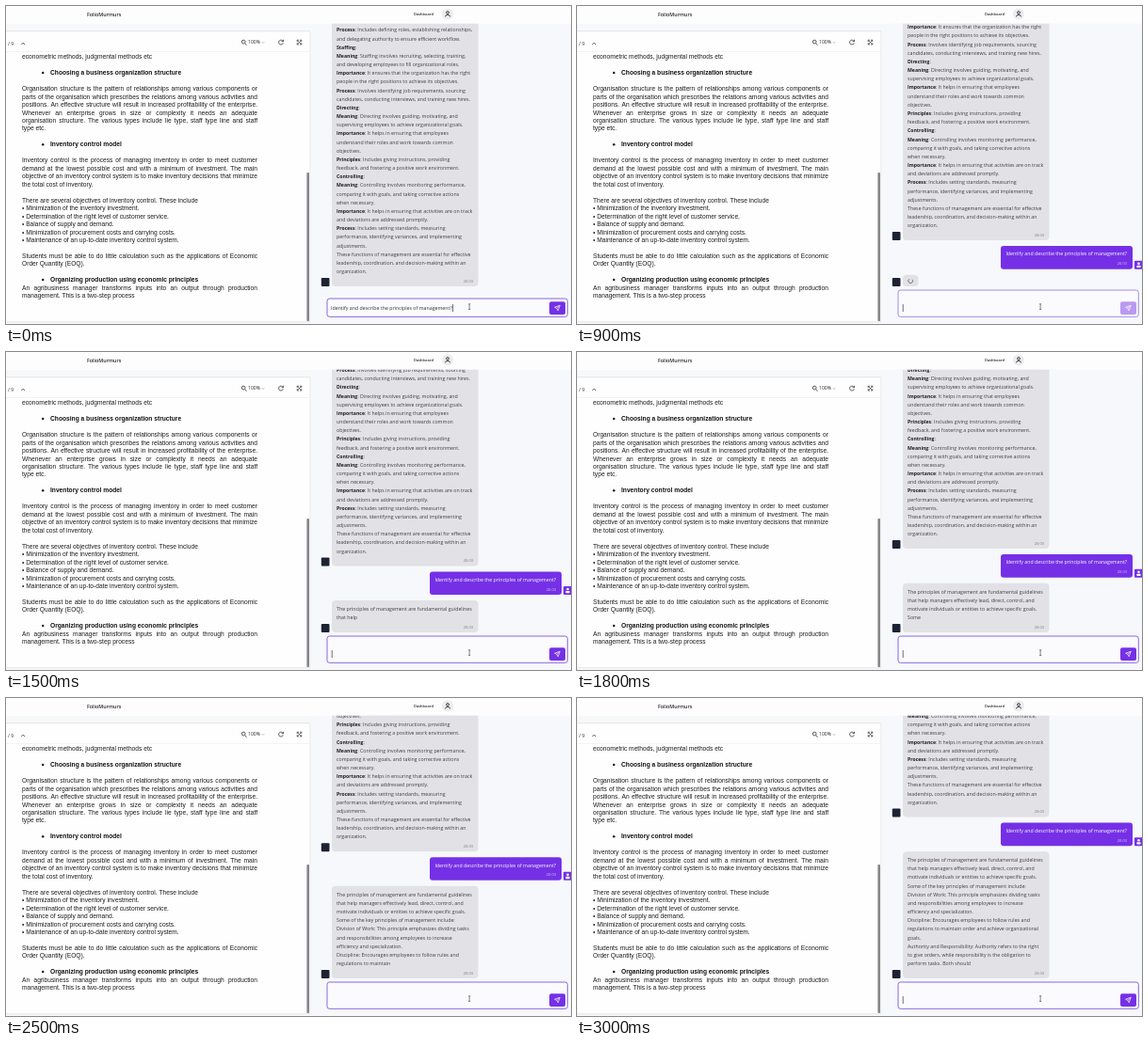
Write an HTML page with a canvas that moves like this. It is 600 px wide and 338 px high and loops after 3.1 s.

```html
<!DOCTYPE html>
<html lang="en">
<head>
<meta charset="utf-8">
<title>Document chat</title>
<style>
html, body { margin: 0; width: 100%; height: 100%; overflow: hidden; background: #fff; }
canvas { display: block; width: 600px; height: 338px; }
</style>
</head>
<body>
<canvas id="stage"></canvas>
<script>
const LOOP = 3100, STEP = 100, SENT = 200, STREAM = 1315, CHARS_PER_MS = 0.371;
const UI = '"Open Sans", "Noto Sans", sans-serif';
const DOC = '"Liberation Sans", Arial, sans-serif';
const PURPLE = '#7530e6', INK = '#3c3c42', BUBBLE = '#e2e2e6', DARK = '#1d2333';
const ROW = 9.17, CHAT_BOTTOM = 298, GAP = 6, PAD = 15.6;
const LOADER_HEIGHT = 12.3, QUESTION_HEIGHT = 24.6;
const QUESTION = 'Identify and describe the principles of management?';

// "#" marks a heading, "=" a justified line
const page = `econometric methods, judgmental methods etc

#Choosing a business organization structure

=Organisation structure is the pattern of relationships among various components or
=parts of the organisation which prescribes the relations among various activities and
=positions. An effective structure will result in increased profitability of the enterprise.
=Whenever an enterprise grows in size or complexity it needs an adequate
=organisation structure. The various types include lie type, staff type line and staff
type etc.

#Inventory control model

=Inventory control is the process of managing inventory in order to meet customer
=demand at the lowest possible cost and with a minimum of investment. The main
=objective of an inventory control system is to make inventory decisions that minimize
the total cost of inventory.

There are several objectives of inventory control. These include
• Minimization of the inventory investment.
• Determination of the right level of customer service.
• Balance of supply and demand.
• Minimization of procurement costs and carrying costs.
• Maintenance of an up-to-date inventory control system.

=Students must be able to do little calculation such as the applications of Economic
Order Quantity (EOQ).

#Organizing production using economic principles
=An agribusiness manager transforms inputs into an output through production
management. This is a two-step process`.split('\n');

const history = `Process: Includes defining roles, establishing relationships,
and delegating authority to ensure efficient workflow.
Staffing:
Meaning: Staffing involves recruiting, selecting, training,
and developing employees to fill organizational roles.
Importance: It ensures that the organization has the right
people in the right positions to achieve its objectives.
Process: Involves identifying job requirements, sourcing
candidates, conducting interviews, and training new hires.
Directing:
Meaning: Directing involves guiding, motivating, and
supervising employees to achieve organizational goals.
Importance: It helps in ensuring that employees
understand their roles and work towards common
objectives.
Principles: Includes giving instructions, providing
feedback, and fostering a positive work environment.
Controlling:
Meaning: Controlling involves monitoring performance,
comparing it with goals, and taking corrective actions
when necessary.
Importance: It helps in ensuring that activities are on track
and deviations are addressed promptly.
Process: Includes setting standards, measuring
performance, identifying variances, and implementing
adjustments.
These functions of management are essential for effective
leadership, coordination, and decision-making within an
organization.`.split('\n');

const answer = `The principles of management are fundamental guidelines
that help managers effectively lead, direct, control, and
motivate individuals or entities to achieve specific goals.
Some of the key principles of management include:
Division of Work: This principle emphasizes dividing tasks
and responsibilities among employees to increase
efficiency and specialization.
Discipline: Encourages employees to follow rules and
regulations to maintain order and achieve organizational
goals.
Authority and Responsibility: Authority refers to the right
to give orders, while responsibility is the obligation to
perform tasks. Both should
`;

const canvas = document.getElementById('stage');
const ctx = canvas.getContext('2d');
const ratio = window.devicePixelRatio || 1;
canvas.width = 600 * ratio;
canvas.height = 338 * ratio;

// Text is laid out ten times larger so that advances keep sub-pixel precision
function setFont(size, family, weight) {
  ctx.font = `${weight} ${size * 10}px ${family}`;
}
function text(str, x, y, size, color = INK, family = UI, weight = 400, align = 'left') {
  setFont(size, family, weight);
  ctx.fillStyle = color;
  ctx.textAlign = align;
  ctx.save();
  ctx.translate(x, y);
  ctx.scale(0.1, 0.1);
  ctx.fillText(str, 0, 0);
  ctx.restore();
  return ctx.measureText(str).width / 10;
}
function justify(str, x, y, width, size, color, family) {
  setFont(size, family, 400);
  const words = str.split(' ');
  const widths = words.map(w => ctx.measureText(w).width / 10);
  const space = (width - widths.reduce((a, b) => a + b)) / (words.length - 1);
  words.forEach((word, i) => {
    text(word, x, y, size, color, family);
    x += widths[i] + space;
  });
}
function box(x, y, w, h, color, r = 0) {
  ctx.fillStyle = color;
  ctx.beginPath();
  ctx.roundRect(x, y, w, h, r);
  ctx.fill();
}
function disc(x, y, r, color) {
  ctx.fillStyle = color;
  ctx.beginPath();
  ctx.arc(x, y, r, 0, 7);
  ctx.fill();
}
function stroke(path, color = '#333', width = 0.8) {
  ctx.strokeStyle = color;
  ctx.lineWidth = width;
  ctx.stroke(new Path2D(path));
}

function drawHeader() {
  box(0, 0, 600, 18.5, '#fdfdfe');
  text('FolioMurmurs', 86, 10.6, 5.35, '#26262b', UI, 600);
  text('Dashboard', 433, 10.2, 3.95, '#26262b', UI, 600);
  disc(469, 8.4, 6, '#ececf0');
  stroke('M467.6 7a1.4 1.4 0 1 0 2.8 0a1.4 1.4 0 1 0 -2.8 0M466.5 11.4q0-2 2.5-2t2.5 2', '#222', 0.8);
}

function drawDocument() {
  box(0, 19, 329, 319, '#f7f8fa');
  box(0, 27, 323, 309, '#fefefe');
  box(0, 26.5, 323, 0.7, '#dedee2');
  box(0, 48.5, 323, 0.6, '#e9e9ec');
  box(0, 335.6, 323, 0.6, '#dedee2');
  box(322.6, 27, 0.6, 309, '#dedee2');
  text('/ 9', 2, 41.8, 5.2, '#333');
  stroke('M16.3 41l1.9-1.9l1.9 1.9');
  stroke('M250.3 38.1a1.9 1.9 0 1 0 3.8 0a1.9 1.9 0 1 0 -3.8 0M253.6 39.6l2 2');
  text('100%', 257, 40.3, 5.05, '#222', UI, 500);
  stroke('M271.8 38.2l1.2 1.2l1.2-1.2', '#888', 0.6);
  stroke('M294.1 37.4a2.4 2.4 0 1 0 .2 1.9M294.5 35.8v1.9h-1.9');
  stroke('M309.2 38v-1.8h1.8M312 36.2h1.8v1.8M313.8 39.2v1.8h-1.8M311 41h-1.8v-1.8M309.3 36.3l4.4 4.6M313.7 36.3l-4.4 4.6', '#333', 0.7);
  page.forEach((line, i) => {
    const y = 56.3 + 8.465 * i, color = '#1c1c1c';
    if (line[0] === '#') {
      disc(39.2, y - 2.2, 1.25, color);
      text(line.slice(1), 47, y, 6.66, '#111', DOC, 700);
    } else if (line[0] === '=') {
      justify(line.slice(1), 17, y, 250, 6.66, color, DOC);
    } else {
      text(line, 17, y, 6.66, color, DOC);
    }
  });
  box(319.4, 177, 2.6, 158, '#86868a', 1);
}

function drawLines(lines, lastBaseline, labelled) {
  lines.forEach((line, i) => {
    const y = lastBaseline - (lines.length - 1 - i) * ROW;
    const cut = labelled ? Math.max(0, line.indexOf(':')) : 0;
    const width = cut && text(line.slice(0, cut), 351, y, 5.15, '#1c1c22', UI, 700);
    text(line.slice(cut), 351 + width, y, 5.28);
  });
}

function drawAvatar(bottom) {
  box(334.8, bottom - 9, 8.7, 9, DARK, 1);
}

function drawReply(lines, bottom, height, labelled) {
  box(346, bottom - height, 155.5, height, BUBBLE, 4);
  drawLines(lines, bottom - 13.9, labelled);
  text('20:03', 496, bottom - 4.2, 4, '#77777d', UI, 400, 'right');
  drawAvatar(bottom);
}

function drawQuestion(bottom) {
  box(450, bottom - QUESTION_HEIGHT, 140, QUESTION_HEIGHT, PURPLE, 3);
  text(QUESTION, 455.4, bottom - 14.3, 5.26, '#fff');
  text('20:03', 584, bottom - 4.4, 4, '#d9c8fa', UI, 400, 'right');
  box(592, bottom - 9, 9, 9, PURPLE, 1);
  disc(596.5, bottom - 6, 1.3, '#fff');
  box(594.3, bottom - 4, 4.4, 2.3, '#fff', 1);
}

function drawLoader(t) {
  drawAvatar(CHAT_BOTTOM);
  box(346, CHAT_BOTTOM - LOADER_HEIGHT, 16.5, LOADER_HEIGHT, BUBBLE, 4);
  const start = Math.PI * (1 + 2 * (t - 500) / 1000);
  ctx.strokeStyle = '#55555c';
  ctx.lineWidth = 0.8;
  ctx.beginPath();
  ctx.arc(354.2, 292.2, 2.4, start, start + Math.PI * 1.5);
  ctx.stroke();
}

// The reply grows at a steady rate and shows whole words only
function streamedLines(t) {
  const count = Math.max(0, Math.floor((t - STREAM) * CHARS_PER_MS));
  const shown = answer.slice(0, count + 1).replace(/\S*$/, '').trimEnd();
  return shown ? shown.split('\n') : [];
}

function drawChat(t) {
  box(329, 18.5, 271, 319.5, '#f6f8fc');
  ctx.save();
  ctx.beginPath();
  ctx.rect(329, 18.5, 271, 281.5);
  ctx.clip();
  let bottom = CHAT_BOTTOM;
  if (t >= SENT) {
    const lines = streamedLines(t);
    const height = lines.length ? lines.length * ROW + PAD : LOADER_HEIGHT;
    if (lines.length) drawReply(lines, bottom, height, false);
    else drawLoader(t);
    bottom -= height + GAP;
    drawQuestion(bottom);
    bottom -= QUESTION_HEIGHT + GAP;
  }
  drawReply(history, bottom, 320, true);
  ctx.restore();
}

function drawInput(t) {
  const typed = t < SENT, waiting = !typed && t < STREAM;
  const top = typed ? 311 : 302;
  ctx.fillStyle = '#fbfbfe';
  ctx.strokeStyle = waiting ? '#a68be6' : '#8a66dc';
  ctx.lineWidth = 1;
  ctx.beginPath();
  ctx.roundRect(341, top, 255.3, 330.3 - top, 2.5);
  ctx.fill();
  ctx.stroke();
  let caret = 345.8;
  if (typed) caret += text(QUESTION, 345, 323.2, 5.26, '#333') - 0.3;
  if (typed || (t + 620) % 1060 < 530) box(caret, 317, 0.7, 8, '#333');
  box(577, 314.3, 17, 13.8, waiting ? '#b99af0' : PURPLE, 2);
  stroke('M582.6 320.2l5.6-2l-2 5.6l-1.2-2.4zM585 321.4l3-3', '#fff', 0.7);
  stroke('M491 316.8h2.2M492.1 316.8v5.6M491 322.4h2.2', '#333', 0.6);
}

function draw(now) {
  const t = Math.floor((now % LOOP) / STEP) * STEP;
  ctx.setTransform(ratio, 0, 0, ratio, 0, 0);
  drawDocument();
  drawChat(t);
  drawHeader();
  drawInput(t);
  requestAnimationFrame(draw);
}
requestAnimationFrame(draw);
</script>
</body>
</html>
```
